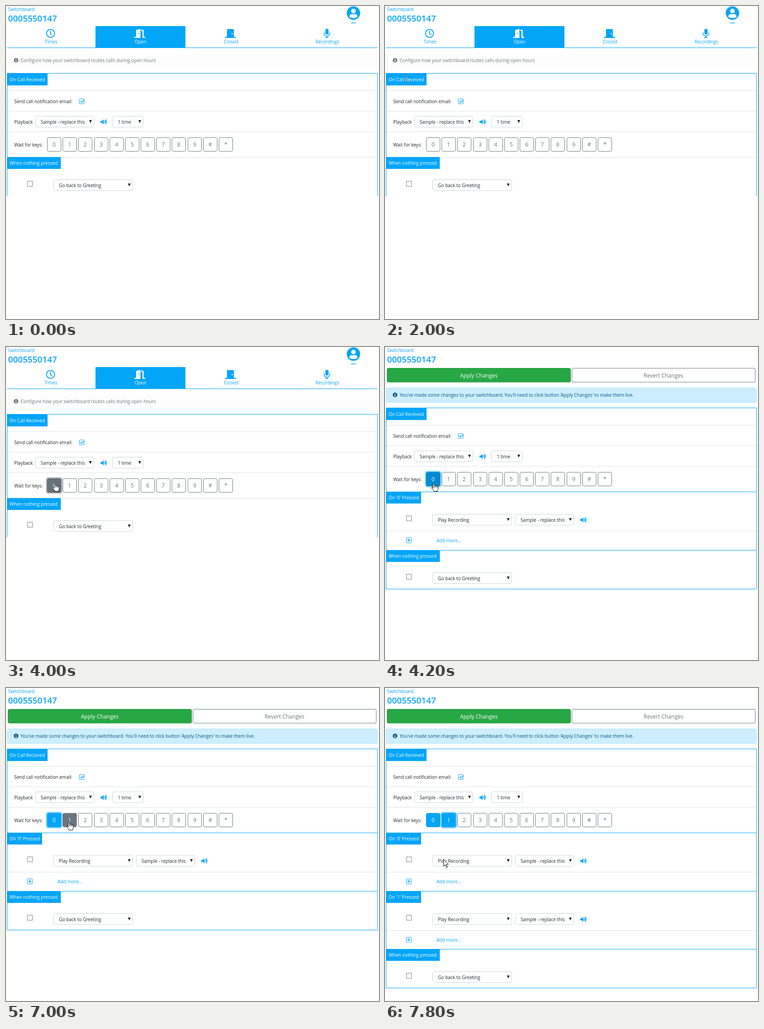
Animation, 817 px wide and 686 px high, one loop 8 s. Source, as an HTML page:

```html
<!DOCTYPE html>
<html lang="en">
<head>
<meta charset="utf-8">
<title>Switchboard</title>
<style>
  html, body { margin: 0; width: 100%; height: 100%; overflow: hidden; background: #fff; }
  svg { display: block; font: 10px "Open Sans", "Noto Sans", sans-serif; fill: #212529; }
  .blue { fill: #02a5f8; }
  .line { fill: none; stroke: #02a5f8; }
  .rule { stroke: #dee2e6; }
  .grey { fill: #6c757d; }
  .white { fill: #fff; }
  .faint { fill: #fdfdfd; }
  .note { fill: #01567f; }
  .alert { fill: #cceefe; stroke: #b6e5fb; }
  .apply { fill: #28a745; stroke: #259c41; }
  .revert { fill: #fff; stroke: #6c757d; }
  .mid { text-anchor: middle; }
  .big { font-size: 12px; }
  .phone { font-size: 18.8px; font-weight: 600; }
  .field { fill: #fff; stroke: #ced4da; }
  .box { fill: #fff; stroke: #8b9197; stroke-width: 1.2; }
  .mark { fill: none; stroke: #fff; stroke-width: 1.3; }
  .key rect { fill: #fff; stroke: #6c757d; }
  .key text { font-size: 12px; fill: #6c757d; text-anchor: middle; }
  .key .ring { fill: none; stroke: none; stroke-width: 3; }
  .key:not(.idle) text { fill: #fff; }
  .hover .face { fill: #6c757d; }
  .press .face { fill: #68727b; stroke: #5a6268; }
  .press .ring { stroke: #b5babe; }
  .on .face { fill: #02a5f8; stroke: #02a5f8; }
  .dark .face { fill: #008ad2; stroke: #0081c5; }
  .focus .ring { stroke: #80d2fb; }
  .cursor { fill: #fff; stroke: #000; stroke-linejoin: round; }
  #beam { fill: none; stroke: #fff; mix-blend-mode: difference; }
</style>
</head>
<body>
<svg id="stage" width="817" height="686" viewBox="0 0 817 686"></svg>
<script>
const stage = document.getElementById('stage');
const byId = id => document.getElementById(id);

const text = (x, y, s, cls = '') => `<text x="${x}" y="${y}" class="${cls}">${s}</text>`;
const rect = (x, y, w, h, cls = '', rx = 0) =>
  `<rect x="${x}" y="${y}" width="${w}" height="${h}" class="${cls}" rx="${rx}"/>`;
const path = (d, cls = '', extra = '') => `<path d="${d}" class="${cls}" ${extra}/>`;
const disc = (x, y, r, cls) => `<circle cx="${x}" cy="${y}" r="${r}" class="${cls}"/>`;
const group = (id, body, extra = '') => `<g id="${id}" ${extra}>${body}</g>`;
const rule = y => path(`M3 ${y + .5}H813`, 'rule');

const select = (x, y, w, label) =>
  rect(x + .5, y + .5, w, 24, 'field', 3) + text(x + 12, y + 16.5, label) +
  path(`M${x + w - 10} ${y + 9}h6l-3 6.5z`);

const speaker = (x, y) =>
  disc(x, y, 11, 'faint') +
  path(`M${x - 6.5} ${y - 2}h3l4 -3.5v11l-4 -3.5h-3z`, 'blue') +
  path(`M${x + 2} ${y - 2}q2 2 0 4M${x + 3} ${y - 4}q4 4 0 8M${x + 4.2} ${y - 5.8}q5 5.8 0 11.6`, 'line', 'stroke-width="1.2"');

const info = (y, cls) =>
  disc(22, y, 5, cls) + path(`M22 ${y - 3}v1.6M21 ${y - .5}h1v3M20.8 ${y + 2.5}h2.6`, 'mark');

const header = (y, w, label) => rect(2, y, w, 26, 'blue') + text(8, y + 17, label, 'white');
const checkbox = y => rect(47, y - 5.5, 11, 11, 'box');

const tabs =
  disc(761, 15.5, 14.7, 'blue') + disc(761, 11, 5, 'white') +
  path('M752 24q0 -6.5 6 -6.5q3 1.5 6 0q6 0 6 6.5q-9 5 -18 0z', 'white') +
  [757.8, 761.2, 764.6].map(x => disc(x, 37, 1.3, 'blue')).join('') +
  rect(196, 44, 197, 47, 'blue') + path('M2 91.5H814', 'line') +
  path('M88.7 60a8.8 8.8 0 1 1 17.6 0a8.8 8.8 0 1 1 -17.6 0M97.5 54.5V60.5L101 63', 'line', 'stroke-width="1.9"') +
  path('M281 67.5H285V52.5L294.5 50V70H281zM296 52H301.5V67.5H305V70H299V54.5H296z', 'white') +
  disc(291.5, 60, 1.2, 'blue') +
  path('M480 67.5H484V52Q484 50.5 485.5 50.5H497.5Q499 50.5 499 52V67.5H503.5V70H480z', 'blue') +
  disc(495.5, 60.5, 1.3, 'white') +
  rect(699.5, 50, 7, 12.5, 'blue', 3.5) +
  path('M696.8 58v2.5a6 5.5 0 0 0 12 0V58M702.8 66v3.2M699 69.2h7.5', 'line', 'stroke-width="1.6"') +
  text(98.5, 82, 'Times', 'blue mid') + text(294.5, 82, 'Open', 'white mid') +
  text(493, 82, 'Closed', 'blue mid') + text(704, 82, 'Recordings', 'blue mid') +
  rect(2, 104, 812, 31, 'faint') + info(119, 'grey') +
  text(32, 123, 'Configure how your switchboard routes calls during open hours', 'grey');

const notice =
  rect(4.5, 46.5, 402, 30.5, 'apply', 3) + text(205.5, 67, 'Apply Changes', 'white big mid') +
  rect(409.5, 46.5, 401.5, 30.5, 'revert', 3) + text(610, 67, 'Revert Changes', 'grey big mid') +
  rect(2.5, 89.5, 811, 32, 'alert', 3) + info(105, 'note') +
  text(32, 109, "You've made some changes to your switchboard. You'll need to click button 'Apply Changes' to make them live.", 'note');

const key = i => {
  const x = Math.round(90 + 34.18 * i);
  return group('key' + i,
    rect(x - 1, 287, 33, 33, 'ring', 4) + rect(x + .5, 288.5, 30, 30, 'face', 3) +
    text(x + 15.5, 308, i < 10 ? i : '#*'[i - 10]), 'class="key idle"');
};
const keys = Array.from({ length: 12 }, (_, i) => key(11 - i)).join('\n');

const received =
  path('M2 147.5H814', 'line') + header(148, 89, 'On Call Received') +
  [185, 230, 275].map(rule).join('') +
  text(18, 213, 'Send call notification email:') +
  rect(160.8, 203.8, 10.5, 10.5, 'line', 1) + path('M163 208.8l2.6 2.6l5 -5', 'line', 'stroke-width="1.6"') +
  text(18, 258, 'Playback') + select(64, 241, 128, 'Sample - replace this') + speaker(213.5, 254) +
  select(233, 241, 67, '1 time') + text(18, 308, 'Wait for keys:') + keys;

const pressed = (i, y) => group('pressed' + i,
  path('M2 .5H814', 'line') + header(0, 77, `On '${i}' Pressed`) + checkbox(58.5) +
  select(104, 49, 173, 'Play Recording') + select(285, 49, 128, 'Sample - replace this') + speaker(434, 62) +
  rule(86) + rect(46.8, 101.3, 11, 11, 'line', 1) + path('M49 106.8h6.6M52.3 103.5v6.6', 'line', 'stroke-width="1.5"') +
  text(113, 111, 'Add more...', 'blue'), `transform="translate(0 ${y})"`);

const nothing =
  rule(0) + group('topLine', path('M2 .5H814', 'line')) + header(0, 118, 'When nothing pressed') +
  checkbox(58.5) + select(104, 49, 173, 'Go back to Greeting') +
  group('bottomLine', path('M2 85.5H814', 'line'));

const cursors =
  group('arrow', path('M.5 .5V15.5L4 12.3L6.6 18.3L8.8 17.3L6.3 11.5H10.8z'), 'class="cursor"') +
  group('hand',
    path('M4 12V2Q4 .5 5.5 .5T7 2V6Q7 5 8.5 5T10 6.5Q10 5.8 11.3 5.8T12.8 7.5Q12.8 6.8 14 6.8T15.4 8.2V12.5Q15.4 14.5 14 16.5V18.5H6V17L1 11.5Q0 10 1.5 9.5T4 11z') +
    path('M7 6V10M10 6.5V10M12.8 7.5V10'), 'class="cursor"') +
  group('beam', path('M0 .5H2.5M3.5 .5H6M3 1V14M0 14.5H2.5M3.5 14.5H6'));

stage.innerHTML =
  text(4.5, 11, 'Switchboard', 'blue') + text(4.5, 33.5, '0005550147', 'blue phone') +
  group('tabs', tabs) + group('notice', notice) +
  path('', 'line', 'id="sides"') + group('received', received) +
  pressed(0, 317) + pressed(1, 445) + group('nothing', nothing) +
  group('dot', rect(816, 685, 1, 1)) + cursors;

// Steps: time, kind, x, y
const pointer = [
  [0, '', 0, 0], [200, 'hand', 260, 300], [400, 'arrow', 40, 146], [600, 'arrow', 44, 150],
  [1400, 'arrow', 45, 151], [2000, 'beam', 44, 151], [2200, 'beam', 44, 155],
  [2400, 'arrow', 61, 169], [2600, 'beam', 86, 199], [2800, 'arrow', 108, 256],
  [3600, 'hand', 99, 289], [3800, 'hand', 101, 298], [4600, 'hand', 102, 298],
  [6000, 'arrow', 83, 349], [6200, 'arrow', 64, 383], [6400, 'arrow', 63, 383],
  [6600, 'arrow', 148, 310], [6800, 'hand', 136, 303], [7000, 'hand', 132, 293],
  [7600, 'arrow', 129, 373], [7800, 'arrow', 128, 375]
];
const keyStates = [
  [[0, 'idle'], [3600, 'hover'], [4000, 'press'], [4200, 'on dark focus'], [6000, 'on focus'], [7400, 'on']],
  [[0, 'idle'], [6800, 'hover'], [7400, 'on dark focus'], [7600, 'on focus']]
];
// Steps: time, pressed sections, top of the last section, panel end
const layouts = [[0, 0, 331, 417], [4200, 1, 445, 531], [7400, 2, 572, 658]];

const at = (steps, t) => steps.findLast(s => s[0] <= t);
const show = (id, on) => byId(id).style.display = on ? '' : 'none';
const move = (id, x, y) => byId(id).setAttribute('transform', `translate(${x} ${y})`);

function draw(t) {
  const [, count, y, end] = at(layouts, t);
  const changed = count > 0;
  const top = changed ? 133 : 147;
  show('tabs', !changed);
  show('notice', changed);
  show('pressed0', changed);
  show('pressed1', count > 1);
  show('topLine', changed);
  show('bottomLine', changed);
  show('dot', t < 200);
  move('received', 0, top - 147);
  move('nothing', 0, y);
  byId('sides').setAttribute('d', `M2.5 ${top}V${end}M813.5 ${top}V${end}`);
  keyStates.forEach((steps, i) => byId('key' + i).setAttribute('class', 'key ' + at(steps, t)[1]));

  const [, kind, px, py] = at(pointer, t);
  for (const id of ['arrow', 'hand', 'beam']) show(id, id === kind);
  if (kind) move(kind, px, py);
}

const start = performance.now();
function tick() {
  draw((performance.now() - start) % 8000);
  requestAnimationFrame(tick);
}
tick();
</script>
</body>
</html>
```
